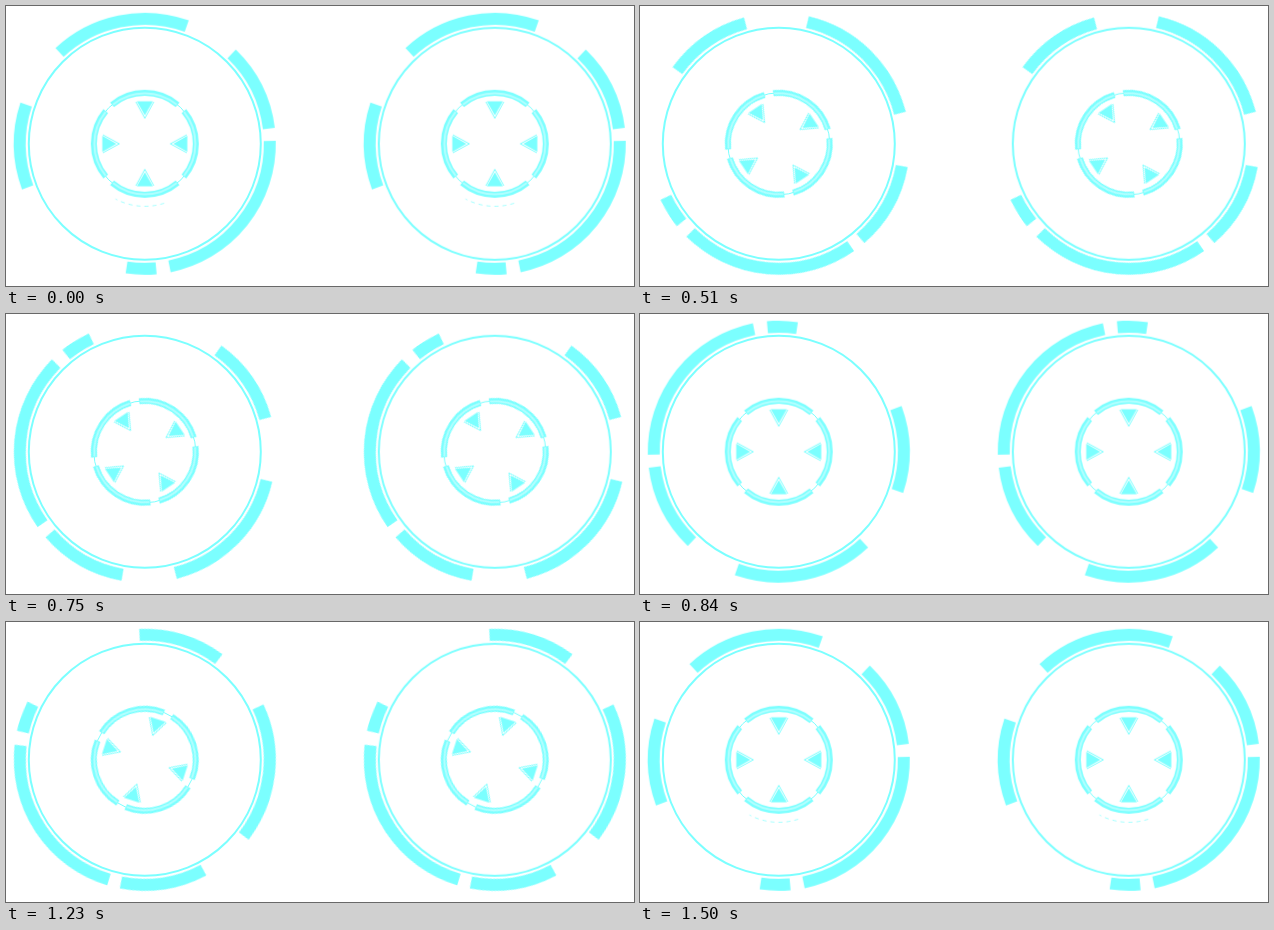
Recreate the animation shown at these times as an HTML page. Size 628x280 px, loop 2160 ms.

```html
<!DOCTYPE html>
<html lang="en">
<head>
<meta charset="utf-8">
<title>Rotating dials</title>
<style>
  html, body { margin: 0; width: 100%; height: 100%; overflow: hidden; background: #fff; }
  svg { display: block; width: 628px; height: 280px; }
  .line { fill: none; stroke: #7bffff; }
  .solid { fill: #7bffff; }
  .groove { fill: none; stroke: #b4ffff; }
</style>
</head>
<body>
<svg id="stage" viewBox="0 0 628 280"></svg>
<script>
const DURATION = 2160;
const CENTERS = [[138.8, 137.8], [488.8, 137.8]];
const QUARTERS = [0, 90, 180, 270];
// Start and end angles of the outer bars, clockwise from the right.
const BARS = [[227, 289.6], [314, 353], [-1.3, 78.6], [84.8, 98.4], [159.6, 198.3]];

const stage = document.getElementById('stage');

function add(parent, tag, attrs = {}) {
  const el = document.createElementNS('http://www.w3.org/2000/svg', tag);
  for (const [key, value] of Object.entries(attrs)) el.setAttribute(key, value);
  parent.appendChild(el);
  return el;
}

function arcPath(radius, from, to) {
  const point = deg => {
    const a = deg * Math.PI / 180;
    return `${(radius * Math.cos(a)).toFixed(2)} ${(radius * Math.sin(a)).toFixed(2)}`;
  };
  return `M${point(from)}A${radius} ${radius} 0 0 1 ${point(to)}`;
}

function addArc(parent, radius, from, to, width, cls = 'line') {
  return add(parent, 'path', { class: cls, d: arcPath(radius, from, to), 'stroke-width': width });
}

function addRing(parent, radius, width) {
  add(parent, 'circle', { class: 'line', r: radius, 'stroke-width': width });
}

function addInnerArc(parent, angle) {
  addArc(parent, 51, angle - 40, angle + 40, 6);
  addArc(parent, 50.5, angle - 39, angle + 39, 2, 'groove');
}

function addArrow(parent, angle) {
  const arrow = add(parent, 'g', { transform: `rotate(${angle})` });
  add(arrow, 'path', { class: 'solid', d: 'M42.5 -8L28.5 0L42.5 8Z' });
  add(arrow, 'path', { class: 'line', d: 'M42 -9L25.5 0L42 9', 'stroke-width': 1 });
}

// Half a turn in 16 ticks of 30 ms, a pause, then back in 15 ticks.
const at = (ms, style, easing = 'linear') => ({ offset: ms / DURATION, easing, ...style });
const turn = (ms, deg, easing) => at(ms, { transform: `rotate(${deg}deg)` }, easing);
const turning = deg => [
  turn(0, 0),
  turn(390, 0, 'steps(16, start)'),
  turn(870, deg),
  turn(1080, deg, 'steps(15, start)'),
  turn(1530, 0),
  turn(DURATION, 0)
];
const resting = [
  at(0, { opacity: 1 }),
  at(390, { opacity: 1 }),
  at(390, { opacity: 0 }),
  at(1500, { opacity: 0 }),
  at(1500, { opacity: 1 }),
  at(DURATION, { opacity: 1 })
];
const loop = { duration: DURATION, iterations: Infinity };

for (const [x, y] of CENTERS) {
  const dial = add(stage, 'g', { transform: `translate(${x} ${y})` });
  addRing(dial, 116, 2);
  addRing(dial, 51, 1);

  const rotor = add(dial, 'g');
  for (const [from, to] of BARS) addArc(rotor, 125, from, to, 12);
  for (const angle of QUARTERS) addArrow(rotor, angle);
  rotor.animate(turning(180), loop);

  const counterRotor = add(dial, 'g');
  for (const angle of QUARTERS) addInnerArc(counterRotor, angle);
  counterRotor.animate(turning(-180), loop);

  const dashes = addArc(dial, 62.5, 72, 118, 0.7);
  dashes.setAttribute('stroke-dasharray', '4 4');
  dashes.animate(resting, loop);
}
</script>
</body>
</html>
```
